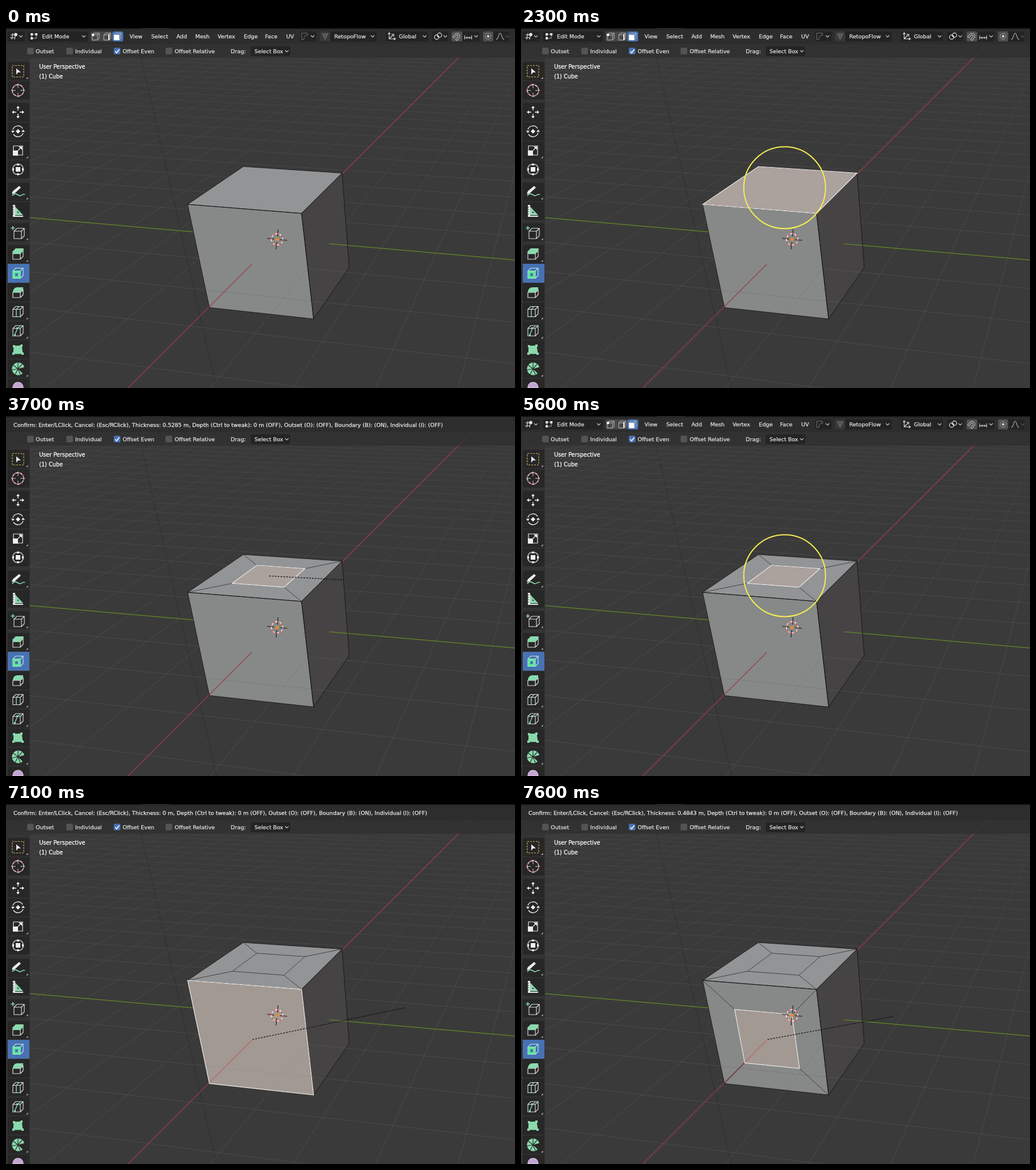
Animation of 890x629 px, one loop 8 s. Source, as an HTML page with a canvas:

```html
<!DOCTYPE html>
<html lang="en">
<head>
<meta charset="utf-8">
<title>Inset faces</title>
<style>
html, body { margin: 0; width: 100%; height: 100%; overflow: hidden; background: #3a3a3a; }
canvas { display: block; }
</style>
</head>
<body>
<canvas id="stage" width="890" height="629"></canvas>
<script>
const ctx = document.getElementById('stage').getContext('2d');
const LOOP = 8000;
const GREEN = '#8ad9ad', LIGHT = '#e4e4e4', BLUE = '#4772b3';
const EDGE = 'rgba(16,16,16,.8)', INSET_EDGE = 'rgba(24,24,24,.65)';

// ---- drawing helpers ----
function ink(path, stroke, fill, width = 1, dash = []) {
  const shape = new Path2D(path);
  ctx.lineWidth = width;
  ctx.setLineDash(dash);
  if (fill) { ctx.fillStyle = fill; ctx.fill(shape); }
  if (stroke) { ctx.strokeStyle = stroke; ctx.stroke(shape); }
  ctx.setLineDash([]);
}
const toPath = points => 'M' + points.map(p => p.join(' ')).join('L');
const closed = points => toPath(points) + 'Z';
const line = (a, b, stroke, width, dash) => ink(toPath([a, b]), stroke, null, width, dash);
function box(x, y, w, h, fill, r = 3) {
  ctx.fillStyle = fill;
  ctx.beginPath();
  ctx.roundRect(x, y, w, h, r);
  ctx.fill();
}
function ring(x, y, r, stroke, width = 1, dash = []) {
  ctx.setLineDash(dash);
  ctx.strokeStyle = stroke;
  ctx.lineWidth = width;
  ctx.beginPath();
  ctx.arc(x, y, r, 0, 2 * Math.PI);
  ctx.stroke();
  ctx.setLineDash([]);
}
function text(str, x, y, color = LIGHT, size = 9.55) {
  ctx.font = size + 'px "DejaVu Sans", sans-serif';
  ctx.fillStyle = ctx.strokeStyle = color;
  ctx.lineWidth = .25;
  ctx.fillText(str, x, y);
  ctx.strokeText(str, x, y);
}
function at(x, y, draw) {
  ctx.save();
  ctx.translate(x, y);
  draw();
  ctx.restore();
}
const chevron = (x, y = 14) => ink(`M${x - 3} ${y - 1}l3 3l3-3`, '#c8c8c8', null, 1.2);
const mix = (a, b, k) => a + (b - a) * k;

// ---- 3D scene: perspective camera, cube of side 2 at the world origin ----
function project(x, y, z) {
  const w = 1 + .0752 * x - .01485 * y - .0436 * z;
  return [(473.6 + 74.87 * x + 81.53 * y - 32.57 * z) / w,
          (369 - 11.43 * x + 2.26 * y - 102.07 * z) / w];
}
const square = s => [[-s, -s], [s, -s], [s, s], [-s, s]];
const topFace = s => square(s).map(([x, y]) => project(x, y, 1));
const frontFace = s => square(s).map(([y, z]) => project(-1, y, z));
const rightFace = square(1).map(([x, z]) => project(x, 1, z));

const gridInk = ctx.createLinearGradient(0, 30, 0, 400);
gridInk.addColorStop(0, 'rgba(105,105,105,.15)');
gridInk.addColorStop(1, 'rgba(102,102,102,.36)');

function floor() {
  for (let x = -5; x <= 30; x++)
    line(project(x, -40, 0), project(x, 20, 0), x ? gridInk : '#638a25', x ? 1 : 1.3);
  for (let y = -40; y <= 20; y++)
    line(project(-6, y, 0), project(30, y, 0), y ? gridInk : '#9f3947', y ? 1 : 1.3);
}

function insetEdges(face, amount) {
  const outer = face(1), inner = face(1 - amount);
  ink(closed(inner) + outer.map((p, i) => toPath([p, inner[i]])).join(''), INSET_EDGE);
}

function cursor() {
  at(474, 369.3, () => {
    ctx.save();
    ctx.rotate(.1);
    for (let i = 0; i < 4; i++) {
      line([5, 0], [17.5, 0], '#161616', 1.1);
      ctx.rotate(Math.PI / 2);
    }
    ctx.restore();
    ring(0, 0, 10, '#f4f4f4', 1.4);
    ring(0, 0, 10, '#d8323c', 1.4, [3.93, 3.93]);
    ctx.fillStyle = '#f08a24';
    ctx.beginPath();
    ctx.arc(0, 0, 2.7, 0, 7);
    ctx.fill();
  });
}

function scene(s) {
  ctx.fillStyle = '#3a3a3a';
  ctx.fillRect(0, 0, 890, 629);
  line([231, 28], [368, 629], 'rgba(25,25,25,.35)');
  floor();

  const faces = [topFace(1), frontFace(1), rightFace].map(closed);
  ['#929496', '#868987', '#464344'].forEach((fill, i) => ink(faces[i], null, fill));

  // the floor hides the lower half of the cube, so its lines show on the sides
  const nearSide = [[-1, -1, -.02], [-1, 1, -.02], [1, 1, -.02], [1, 1, -1], [-1, 1, -1], [-1, -1, -1]];
  ctx.save();
  ctx.clip(new Path2D(closed(nearSide.map(p => project(...p)))));
  floor();
  ctx.restore();

  ink(faces.join(''), EDGE);
  if (s.topInset) insetEdges(topFace, s.topInset);
  if (s.frontInset) insetEdges(frontFace, s.frontInset);
  if (s.selected) {
    const selection = s.selected === 'top' ? topFace(1 - s.topInset) : frontFace(1 - s.frontInset);
    ink(closed(selection), '#f4f2f0', 'rgba(217,184,168,.35)', 1.2);
  }
  cursor();
  if (s.pull) line(s.pull[0], s.pull[1], '#0c0c0c', 1.2, [3, 2]);
  if (s.ring) ring(...s.ring, 71.5, '#f3ee52', 2);
}

// ---- interface ----
const CUBE = 'M-9-4H4V9H-9ZM-9-4L-4-9H9V4L4 9M4-4L9-9';
const cube = (color = LIGHT) => ink(CUBE, color, null, 1.1);
const ARROWS = 'M0-11l3 4h-6zM0 11l3-4h-6zM-11 0l4-3v6zM11 0l-4-3v6z';

const tools = [
  [75.5, () => {
    ink('M-10-10H10V10H-10Z', '#d9b45a', null, 1.2, [3, 2]);
    ink('M-3-5L5 2L0 2L-3 6Z', null, '#f2f2f2');
  }, 1],
  [109, () => {
    ring(0, 0, 10, '#eee', 1.3);
    ring(0, 0, 10, '#d8505a', 1.3, [3.93, 3.93]);
    ink('M0-12V-4M0 4V12M-12 0H-4M4 0H12', '#ccc');
  }],
  [147, () => {
    ink(ARROWS, null, '#eee');
    ink('M0-8V-3M0 3V8M-8 0H-3M3 0H8', '#eee', null, 1.4);
  }],
  [180.5, () => {
    ink('M-9-3A9.5 9.5 0 0 1 8-5M9 3A9.5 9.5 0 0 1-8 5', LIGHT, null, 1.4);
    ink('M0-4l4 4l-4 4l-4-4zM-12-1h6l-3 4zM12 1h-6l3-4z', null, '#eee');
  }],
  [214, () => {
    ink('M-8-8H8V8H-8Z', LIGHT, null, 1.2);
    ink('M-9 0H0V9H-9ZM7-7v6l-6-6z', null, '#eee');
    ink('M0 0L5-5', '#eee', null, 1.3);
  }, 1],
  [247, () => {
    ring(0, 0, 9.5, LIGHT, 1.2);
    ink('M-4-4H4V4H-4Z' + ARROWS, null, '#eee');
  }],
  [286, () => {
    ink('M-10 7C-4-1 0 8 4 7S9 3 12 5', GREEN, null, 1.6);
    ink('M-11 4L-9-1L2-10L5-7L-6 3Z', null, '#eee');
  }, 1],
  [319, () => {
    ink('M-5-7L9 8H-5ZM-1 1v3h3z', null, GREEN);
    ink('M-9-10h4v19h14v2H-9z', null, LIGHT);
    ink('M-9-6h2M-9-2h2M-9 2h2M-9 6h2', '#333');
  }],
  [357, () => {
    at(2, 2, () => cube());
    ink('M-9-11v7M-12.5-7.5h7', GREEN, null, 1.6);
  }, 1],
  [395, () => {
    cube();
    ink('M-9-4L-4-10H10L4-4ZM-9-4H4V0H-9ZM4-4L9-9V-5L4 0Z', null, GREEN);
  }, 1],
  [428.5, () => {
    cube('#b9e8e0');
    ink('M-9-4H4V9H-9Z', null, '#65e79f');
    ink('M-5 0H0V5H-5Z', null, BLUE);
  }],
  [462, () => {
    ink('M-9 0H4V9H-9ZM4 0L9-4V4L4 9', LIGHT, null, 1.2);
    ink('M-9 0C-9-5-6-9-1-9H9V-4L4 0Z', null, GREEN);
  }],
  [495.5, () => {
    cube();
    ink('M-3-4V9M-3-4L2-9', GREEN, null, 1.4);
  }, 1],
  [529, () => {
    cube();
    ink('M-6 8L-1-4L4-8', GREEN, null, 1.4);
    ink('M-3-6h3v3h-3zM-7 6h3v3h-3z', null, GREEN);
  }, 1],
  [562, () => {
    ink('M-7-6L6-7L8 7L-8 7Z', GREEN, GREEN);
    ink('M-9-8h4v4h-4zM4-9h4v4h-4zM6 5h4v4h-4zM-10 5h4v4h-4z', null, GREEN);
  }],
  [595.5, () => {
    ink('M0 0L11-3A11 11 0 1 0 8 8Z', null, GREEN);
    ink('M0 0L0-11M0 0L-9-7M0 0L-11 2M0 0L-5 10M0 0L4 10M0 0L7-8', '#2a2a2a', null, 1.2);
  }, 1],
  [628, () => ink('M-9 1C-9-6-5-9 0-9S9-6 9 1Z', '#eadcf0', '#c4a5d4')],
];

// first and last cell edge of each button group
const groups = [[59, 125], [131, 263], [270, 335], [341, 373], [379, 640]];

function toolbar() {
  ctx.fillStyle = 'rgba(50,50,50,.82)';
  ctx.fillRect(0, 52, 42, 577);
  for (const [top, bottom] of groups) {
    box(3, top, 38, bottom - top, '#272727');
    for (let y = top + 33.2; y < bottom - 5; y += 33.25) line([3, y], [41, y], '#393939');
  }
  box(3, 412, 38, 33, BLUE, 0);
  for (const [y, icon, hasMore] of tools) {
    at(21, y, icon);
    if (hasMore) ink(`M38.5 ${y + 10}v3.5h-3.5z`, null, '#aaa');
  }
}

function checkbox(x, label, labelX, checked) {
  box(x, 34.5, 11.5, 11.5, checked ? BLUE : '#545454', 2);
  if (checked) ink(`M${x + 2.5} 40.5l2.5 3l4.5-6`, '#fff', null, 1.6);
  text(label, labelX, 44);
}

function settings() {
  ctx.fillStyle = 'rgba(48,48,48,.82)';
  ctx.fillRect(0, 28, 890, 24);
  checkbox(37, 'Outset', 52);
  checkbox(105.5, 'Individual', 121);
  checkbox(188.5, 'Offset Even', 204, true);
  checkbox(279, 'Offset Relative', 295);
  text('Drag:', 393, 44);
  box(428, 32, 69, 17, '#242424');
  text('Select Box', 434.5, 44);
  chevron(491, 40);
}

function menus() {
  for (const [x, w] of [[3, 30], [38, 105], [514, 29], [549, 99], [664, 74], [745, 28], [779, 49], [834, 46]])
    box(x, 6, w, 17.5, '#232323');
  ink('M8 12H19M7 17H16M12 9L10 20M16 14L15 20', LIGHT, null, 1.1);
  ink('M17 8.5a3 3 0 1 0 .1 0z', null, LIGHT);
  chevron(26);
  ink('M45 11H53V18H45Z', '#aaa');
  ink('M43 9h4v4h-4zM51 9h4v4h-4zM43 16h4v4h-4z', null, LIGHT);
  text('Edit Mode', 63, 18);
  chevron(136);

  box(148, 6, 38, 17.5, '#474747');
  box(186, 6, 19, 17.5, BLUE);
  for (const x of [157, 177, 195]) at(x, 15, () => {
    ink('M-6-3H3V6H-6ZM-6-3L-3-6H6V3L3 6M3-3L6-6', '#bbb');
    if (x === 157) ink('M-7-5h4v4h-4z', null, '#fff');
    if (x === 177) ink('M3-4V6', '#fff', null, 2);
    if (x === 195) ink('M-6-3H3V6H-6Z', null, '#fff');
  });

  const labels = { View: 216, Select: 254, Add: 298, Mesh: 331, Vertex: 370, Edge: 416, Face: 453, UV: 490 };
  for (const name in labels) text(name, labels[name], 18);

  ink('M517 20V9H527V13C522 13 521 15 521 20Z', '#777');
  chevron(536);
  box(549, 6, 18, 17.5, '#393939');
  ink('M553 10H563L558 20ZM555 12L561 12L558 17Z', '#777');
  text('RetopoFlow', 574, 18);
  chevron(641);
  ink('M670 9V19H680M670 19L677 12M668 11l2-3l2 3M678 17l3 2l-3 2M674 11h4v4', LIGHT, null, 1.1);
  text('Global', 687, 18);
  chevron(732);
  ring(753, 16, 3.8, LIGHT, 1.2);
  ring(758, 12.5, 3.8, LIGHT, 1.2);
  ink('M755 14h1.5v1.5h-1.5z', LIGHT, LIGHT);
  chevron(768);
  box(779, 6, 19, 17.5, '#505050');
  at(788, 15, () => {
    ctx.rotate(.75);
    ink('M-5 5V-1A5 5 0 0 1 5-1V5H2V-1A2 2 0 0 0-2-1V5Z', '#bbb');
  });
  ink('M802 17H815M802 13V20M806 15V19M810 15V19M814 13V20', LIGHT);
  chevron(822);
  box(834, 6, 18, 17.5, '#505050');
  ring(843, 14.5, 5, '#999');
  ink('M843 12.5a2 2 0 1 0 .1 0z', null, '#ddd');
  ink('M857 20C862 19 861 9 864 9S866 19 871 20', '#aaa', null, 1.1);
  ink('M874 13l3 3l3-3', '#555', null, 1.2);
}

function header(thickness) {
  ctx.fillStyle = '#2d2d2d';
  ctx.fillRect(0, 0, 890, 28);
  ctx.fillStyle = '#181818';
  ctx.fillRect(0, 0, 890, 2);
  ctx.fillStyle = '#333';
  ctx.fillRect(237, 0, 50, 1);
  if (thickness === null) return menus();
  const amount = thickness ? thickness.toPrecision(4) : '0';
  text(`Confirm: Enter/LClick, Cancel: (Esc/RClick), Thickness: ${amount} m, Depth (Ctrl to tweak): 0 m (OFF), ` +
    'Outset (O): (OFF), Boundary (B): (ON), Individual (I): (OFF)', 13, 19, '#f0f0f0');
}

// ---- timeline ----
function stateAt(t) {
  const steps = (start, count) => {
    const k = Math.min(1, Math.max(0, Math.floor((t - start) / 100) / count));
    return k * k * (3 - 2 * k);
  };
  const topPull = steps(3300, 4), frontPull = steps(7100, 5);
  const s = {
    topInset: t < 3300 ? 0 : mix(.01927, .5285, topPull),
    frontInset: .4843 * frontPull,
    selected: t < 1000 ? null : t < 6600 ? 'top' : 'front',
    thickness: null,
  };
  if (t >= 2900 && t < 5600) {
    s.thickness = s.topInset;
    s.pull = [[460, 279.5], t < 3300 ? [642, 283.3] : [mix(640, 590, topPull), mix(283.3, 286.3, topPull)]];
  } else if (t >= 7100) {
    s.thickness = s.frontInset;
    s.pull = [[431, 411.5], [mix(698, 651, frontPull), mix(356, 371, frontPull)]];
  } else if (t >= 1000 && t < 6600) s.ring = [461, 279];
  else if (t >= 6700) s.ring = [431, 411];
  return s;
}

function frame(now) {
  const s = stateAt(now % LOOP);
  scene(s);
  toolbar();
  settings();
  header(s.thickness);
  text('User Perspective', 58, 71, '#fff', 9.6);
  text('(1) Cube', 58, 88, '#fff', 9.6);
  requestAnimationFrame(frame);
}
requestAnimationFrame(frame);
</script>
</body>
</html>
```
